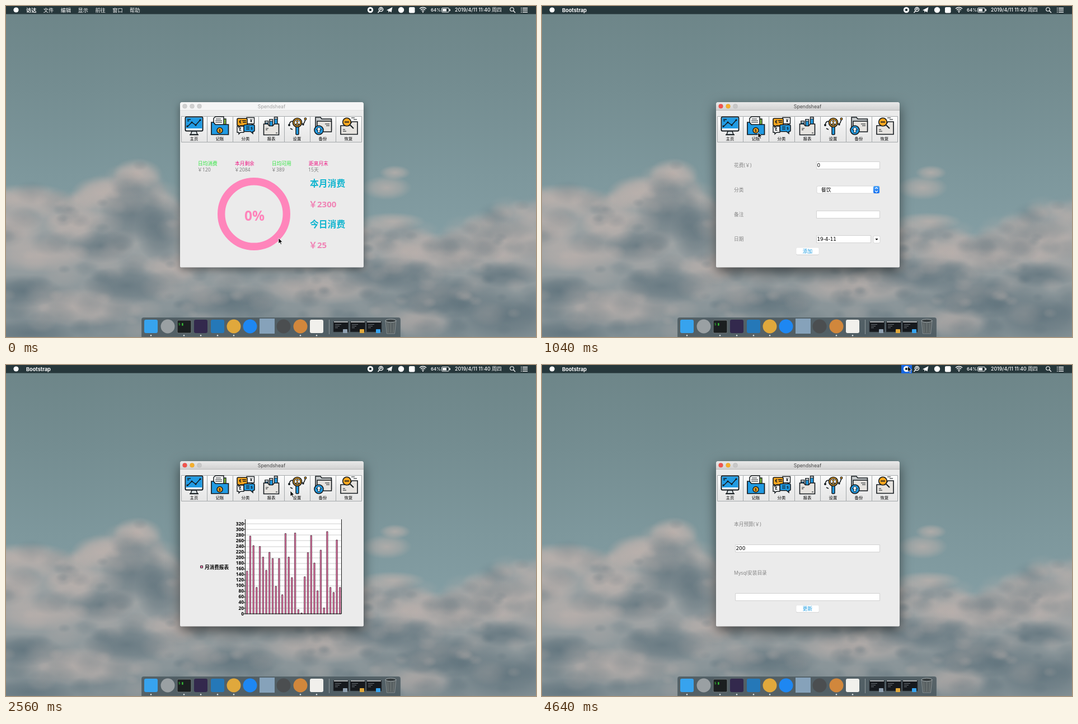
Recreate the animation shown at these times as an HTML page with a canvas. Size 947x592 px, loop 4720 ms.

```html
<!DOCTYPE html>
<html lang="zh-CN">
<head>
<meta charset="utf-8">
<title>Spendsheaf</title>
<style>
html, body { margin: 0; width: 100%; height: 100%; overflow: hidden; background: #7a9398; }
canvas { display: block; }
</style>
</head>
<body>
<canvas id="stage" width="947" height="592"></canvas>
<script>
const W = 947, H = 592, LOOP = 4720, STEP = 80;
const stage = document.getElementById('stage').getContext('2d');
let g = stage;

const CJK = '"Noto Sans CJK SC", sans-serif';
const UI = 'Inter, ' + CJK, SANS = '"Noto Sans", ' + CJK, WIDE = '"DejaVu Sans", ' + CJK;
const BLUE = '#219be3', ORANGE = '#f9a61f', PINK = '#ff85bb', INK = '#141a1e';

// ---- drawing helpers ----
function text(s, x, y, size, color, { font = SANS, weight = 400, align = 'left' } = {}) {
  g.font = `${weight} ${size}px ${font}`;
  g.textAlign = align;
  g.fillStyle = color;
  g.fillText(s, x, y + size * 0.37);
}
function paint(fill, stroke, width = 1) {
  if (fill) { g.fillStyle = fill; g.fill(); }
  if (stroke) { g.strokeStyle = stroke; g.lineWidth = width; g.stroke(); }
}
function box(x, y, w, h, fill, { r = 0, stroke, width } = {}) {
  g.beginPath();
  g.roundRect(x, y, w, h, r);
  paint(fill, stroke, width);
}
function disc(x, y, r, fill, stroke, width) {
  g.beginPath();
  g.arc(x, y, r, 0, 7);
  paint(fill, stroke, width);
}
function shape(d, fill, stroke, width) {
  const p = new Path2D(d);
  if (fill) { g.fillStyle = fill; g.fill(p); }
  if (stroke) { g.strokeStyle = stroke; g.lineWidth = width || 1; g.stroke(p); }
}
function vertical(y0, y1, ...colors) {
  const gr = g.createLinearGradient(0, y0, 0, y1);
  colors.forEach((c, i) => gr.addColorStop(i / (colors.length - 1), c));
  return gr;
}
function puff(x, y, rx, ry, rgb, alpha) {
  g.save();
  g.translate(x, y);
  g.scale(rx, ry);
  const gr = g.createRadialGradient(0, 0, 0, 0, 0, 1);
  gr.addColorStop(0, `rgba(${rgb},${alpha})`);
  gr.addColorStop(0.55, `rgba(${rgb},${alpha * 0.6})`);
  gr.addColorStop(1, `rgba(${rgb},0)`);
  g.fillStyle = gr;
  g.fillRect(-1, -1, 2, 2);
  g.restore();
}

// ---- desktop ----
const LIGHT = '190,178,173', SHADE = '92,112,122';
const SKYLINE = [[0, 335], [60, 328], [112, 348], [145, 320], [190, 312], [205, 290], [240, 283],
  [268, 298], [286, 335], [330, 365], [620, 400], [700, 385], [770, 420], [835, 385], [890, 362], [947, 350]];
const LIT = [[40, 345, 80, 28], [235, 300, 45, 28], [170, 335, 55, 32], [60, 445, 90, 32], [15, 400, 50, 40],
  [120, 390, 50, 35], [130, 540, 120, 35], [300, 470, 60, 30], [680, 325, 45, 22], [695, 298, 28, 13],
  [780, 440, 120, 35], [900, 420, 90, 40], [740, 565, 60, 30], [560, 505, 120, 30], [690, 385, 60, 16]];
const DARK = [[225, 370, 60, 55], [275, 400, 45, 60], [170, 430, 60, 30], [30, 510, 70, 30], [215, 500, 80, 35],
  [690, 480, 90, 32], [780, 520, 100, 40], [890, 555, 95, 45], [400, 530, 100, 30], [40, 585, 90, 25],
  [890, 480, 70, 24]];

function sky() {
  g.fillStyle = vertical(0, H, '#6d8588', '#748d91', '#7d979c', '#859fa5', '#88a0a6');
  g.fillRect(0, 0, W, H);
  g.filter = 'blur(6px)';
  g.beginPath();
  g.moveTo(-20, 340);
  SKYLINE.forEach(p => g.lineTo(...p));
  g.lineTo(W + 20, 350);
  g.lineTo(W + 20, H + 20);
  g.lineTo(-20, H + 20);
  paint(vertical(290, H, '#a1a6a6', '#99a0a2', '#828f94'));
  g.filter = 'none';
  LIT.forEach(b => puff(...b, LIGHT, 0.75));
  DARK.forEach(b => puff(...b, SHADE, 0.75));
  let seed = 11;
  const rnd = () => (seed = seed * 16807 % 2147483647) / 2147483647;
  for (let i = 0; i < 420; i++) {
    const x = rnd() * W, k = SKYLINE.findIndex(p => p[0] >= x);
    const [x0, y0] = SKYLINE[k - 1], [x1, y1] = SKYLINE[k];
    const top = y0 + (y1 - y0) * (x - x0) / (x1 - x0), depth = rnd() ** 1.5;
    const r = 7 + rnd() * 18;
    puff(x, top + depth * (H - top), r * 1.5, r, rnd() > 0.3 + depth * 0.35 ? LIGHT : SHADE, 0.22);
  }
}

function statusIcons() {
  disc(651, 7, 5.2, '#fff');
  box(649, 5, 4, 4, '#26373b', { r: 1 });
  disc(670, 6, 3.6, null, '#fff', 1.5);
  shape('M667.5 8.8 L664.5 12 M668.5 7 l1.5-2.5 1.5 2', null, '#fff', 1.5);
  shape('M680 7.5 L690.5 2 688.5 11.5 685.5 9.3 683.5 12 683.3 8.6Z', '#fff');
  disc(706, 7, 5.2, '#fff');
  box(720, 2, 10.5, 10.5, '#fff', { r: 2 });
  for (const r of [3, 6, 9]) {
    g.beginPath();
    g.arc(745, 11.5, r, -2.3, -0.84);
    paint(null, '#fff', 1.4);
  }
  disc(745, 11, 1, '#fff');
  text('64%', 759, 7, 8, '#fff', { font: UI, weight: 500 });
  box(778.5, 3.5, 13, 7.5, null, { r: 1.5, stroke: '#fff' });
  box(780, 5, 7, 4.5, '#fff');
  box(792.5, 5.5, 1.5, 3.5, '#fff');
  text('2019/4/11 11:40 周四', 802, 7, 8.8, '#fff', { font: UI, weight: 500 });
  disc(904, 6, 3.3, null, '#fff', 1.1);
  shape('M906.5 8.5 L910 12', null, '#fff', 1.2);
  for (const y of [3, 6.5, 10]) { box(920, y, 1.5, 1.5, '#fff'); box(923, y, 9, 1.5, '#fff'); }
}

function dock() {
  box(242, 557, 463, 40, 'rgba(72,86,92,.82)', { r: 4, stroke: 'rgba(130,145,150,.35)' });
  const tile = (x, c) => box(x - 12, 561, 24, 24, c, { r: 3 });
  const coin = (x, c) => disc(x, 573, 12.5, c);
  tile(259, '#37a3ee');
  coin(289, '#9aa0a3');
  box(306, 562, 25, 23, '#1b1f20', { r: 2, stroke: '#70787a' });
  text('$ ▮', 308, 569, 6, '#37c837', { font: WIDE });
  tile(348, '#33294d');
  tile(378, '#2578b8');
  coin(407, '#e0a83c');
  coin(436, '#1e87f2');
  box(453, 559, 27, 27, '#86a2ba');
  coin(496, '#4b4e50');
  coin(526, '#d1873c');
  tile(555, '#f1f0ec');
  box(577, 561, 1, 26, '#90999c');
  [['#8fa0b0', 598], ['#e0a83c', 628], ['#37a3ee', 657]].forEach(([badge, x]) => {
    box(x - 13, 564, 27, 19, '#16191d', { stroke: '#3b4247', width: 0.6 });
    box(x - 12, 564, 25, 2, '#a9adaf');
    for (let i = 0; i < 3; i++) box(x - 10, 569 + i * 3, 11 - i * 3, 0.8, '#858b90');
    box(x + 4, 578, 8, 7, badge, { r: 1 });
  });
  shape('M678 563 L697 563 694.5 586 680.5 586Z', '#596163', '#91999b', 0.8);
  g.beginPath();
  g.ellipse(687.5, 563, 9.5, 2.8, 0, 0, 7);
  paint('#343a3c', '#a8b0b2', 1);
  shape('M682 567 L683 584 M687.5 567 V584 M693 567 L692 584', null, '#79827f', 0.8);
  for (const x of [259, 318, 348, 378, 407, 526, 555]) disc(x, 589.3, 1.2, '#e8eeee');
}

// ---- toolbar ----
const LABELS = ['主页', '记账', '分类', '报表', '设置', '备份', '恢复'];
const ICONS = [
  () => {
    box(320.5, 198.5, 31, 25, '#fff', { r: 2, stroke: INK, width: 2 });
    box(321.5, 199.5, 29, 19.5, BLUE);
    shape('M324 216 L332 208 339 213 347 204 M324 203h6 M324 205.5h3', null, INK, 1.5);
    for (const [x, y] of [[324, 215], [332, 208], [339, 213], [347, 204]]) disc(x, y, 1.6, INK);
    shape('M332 224 h8 l2 6 h-12z', '#d7dde0', INK, 1.5);
    shape('M328 230.3 h16', null, INK, 1.8);
  },
  () => {
    shape('M375 212 V202 h18 v10z', '#86c440', INK, 1.3);
    shape('M371 214 V201 l3-3 h15 v16z', '#fff', INK, 1.5);
    shape('M375 202h9 M374 205h12 M374 208h12', null, INK, 1.2);
    shape('M367 230 V208 h4 l3 4 h23.5 v18z', BLUE, INK, 1.7);
    disc(382, 222.5, 5, ORANGE, INK, 1.5);
    text('$', 382, 222.5, 7.5, INK, { weight: 700, align: 'center' });
  },
  () => {
    shape('M430 199.5 h13.5 v11 h-2 l-2 2.5 v-2.5 h-9.5z', '#fff', INK, 1.4);
    shape('M413 215 h12 v11 h-6 l-3 3 v-3 h-3z', '#fff', INK, 1.4);
    shape('M415 201 h14 q2 0 2 2 v9 q0 2-2 2 h-10 l-3 3 v-3 h-1 q-2 0-2-2 v-9 q0-2 2-2z', ORANGE, INK, 1.6);
    shape('M427 212.5 h15 q2 0 2 2 v8 q0 2-2 2 h-1 v3.5 l-4-3.5 h-10 q-2 0-2-2 v-8 q0-2 2-2z', BLUE, INK, 1.6);
    shape('M423 208h6 M422 205h7 M429 216.5h6 M429 220h6', null, INK, 1.3);
    text('¥', 438, 205, 8, INK, { weight: 700, align: 'center' });
    text('€', 418.5, 207.5, 8, INK, { weight: 700, align: 'center' });
    text('£', 418.5, 220.5, 8, INK, { weight: 700, align: 'center' });
    text('$', 439, 218.5, 7, INK, { weight: 700, align: 'center' });
  },
  () => {
    [[463, 206], [471, 203], [479.5, 199]].forEach(([x, y]) => {
      box(x, y, 5.5, 218 - y, BLUE, { stroke: INK, width: 1.4 });
      box(x, y, 5.5, 3, '#e9edf0', { stroke: INK, width: 1.1 });
    });
    shape('M460.5 230.5 V211 h7 l3 3.5 h6 l3-3.5 h8 v19.5z', '#e6e3df', INK, 1.6);
    shape('M464 219h5 M464 221.5h3 M482 227h3', null, INK, 1);
  },
  () => {
    shape('M506 212 Q508 204 514 207 M527 208 Q532 216 535 202 M508 219 l4 2', null, INK, 1.5);
    disc(506, 213, 2, INK); disc(535, 202, 1.8, ORANGE, INK, 1.2); disc(531, 212, 1.7, INK);
    box(518, 216, 5, 14, BLUE, { r: 1, stroke: INK, width: 1.5 });
    disc(520.5, 208.5, 8, ORANGE, INK, 1.7);
    disc(520.5, 208.5, 5.3, '#fff', INK, 1.1);
    disc(520.5, 206.5, 1.8, ORANGE, INK, 1);
    shape('M517 212 q3.5-5 7 0z', ORANGE, INK, 1);
  },
  () => {
    shape('M553 222 V199 h9 l2 3 h17.5 v20z', '#c5c9cb', INK, 1.5);
    shape('M556 225 V206 h25.5 v19z', '#e6e3df', INK, 1.5);
    shape('M570 211h8 M572 214h6', null, INK, 1);
    disc(559, 222, 8, BLUE, INK, 1.6);
    shape('M559 216.5 l4.5 5 h-2.7 v5 h-3.6 v-5 h-2.7z', '#fff', INK, 1);
  },
  () => {
    shape('M598 229.5 V214 h15 l5-7 h10 v22.5z', '#e6e3df', INK, 1.6);
    shape('M615 213 L621 219', null, INK, 2);
    shape('M602 221h4 M602 224h6 M617 200h6 M621 203h6', null, INK, 1.1);
    disc(609, 207.5, 7.3, ORANGE, INK, 1.6);
    shape('M605 207.5 h8', null, INK, 1.8);
  },
];

function toolbar(pressed) {
  ICONS.forEach((icon, i) => {
    const x = 313 + 46 * i;
    box(x + 0.5, 197.5, 46, 46, vertical(197, 243, '#fdfdfd', '#eeeeee', '#e6e6e6'), { stroke: '#a5a9ab' });
    icon();
    text(LABELS[i], x + 23, 237.5, 7.4, '#000', { align: 'center', weight: 500 });
    if (i === pressed) box(x + 1, 198, 45, 45, 'rgba(50,50,50,.38)');
  });
}

// ---- window pages ----
const caption = (s, y) => text(s, 343, y, 8.7, '#858585');
function field(x, y, w, value = '') {
  box(x + 0.5, y + 0.5, w - 1, 13, '#fff', { stroke: '#d2d2d2' });
  text(value, x + 1.5, y + 7, 8.8, '#000', { font: WIDE });
}
function button(s, x, y) {
  box(x, y + 1, 41, 12.5, '#c9c9c9', { r: 2.5 });
  box(x, y, 41, 12.8, '#fff', { r: 2.5, stroke: '#dadada', width: 0.5 });
  text(s, x + 20.5, y + 6.4, 8.7, '#1a9be0', { weight: 500, align: 'center' });
}

function home() {
  [['日均消费', '￥120'], ['本月剩余', '￥2084'], ['日均可用', '￥389'], ['距离月末', '15天']].forEach(([name, value], i) => {
    const x = 343 + 66 * i;
    text(name, x, 282, 8.7, i % 2 ? '#ee1783' : '#2ce63c', { weight: 500 });
    text(value, x - 1, 292.5, 8.7, '#808080');
  });
  disc(443, 372, 58.3, null, PINK, 13.4);
  text('0%', 444, 375, 24.5, PINK, { weight: 700, align: 'center' });
  [['本月消费', '￥2300', 317], ['今日消费', '￥25', 390.5]].forEach(([name, value, y]) => {
    text(name, 543, y, 15.8, '#10b5cf', { weight: 700 });
    text(value, 541, y + 37, 15, '#f083b5', { weight: 600 });
  });
}

function record() {
  ['花费(￥)', '分类', '备注', '日期'].forEach((s, i) => caption(s, 285 + 44 * i));
  field(490, 278, 114, '0');
  box(491, 322, 112, 13, '#fff', { r: 2.5, stroke: '#d0d0d0', width: 0.8 });
  text('餐饮', 499, 328.5, 8.7, '#000', { weight: 500 });
  box(592, 322, 11, 13, vertical(322, 335, '#4aa3f8', '#1670f0'), { r: 2.5 });
  shape('M595 327 l2.5-2.5 2.5 2.5 M595 330.5 l2.5 2.5 2.5-2.5', null, '#fff', 1.2);
  field(490, 366, 114);
  field(490, 410, 98, '19-4-11');
  box(592, 411, 12, 13, '#fff', { r: 2.5, stroke: '#cfcfcf', width: 0.8 });
  shape('M595.5 416 h5 l-2.5 3z', '#000');
  button('添加', 454, 432);
}

function categories() {
  box(343.5, 276.5, 262.5, 143, '#fff', { stroke: '#9c9c9c' });
  box(344, 277, 261.5, 10.5, '#f4f4f4');
  text('分类名称', 346, 282.3, 7.4, '#000');
  text('消费次数', 476, 282.3, 7.4, '#000');
  ['餐饮', '交通', '住宿', '话费'].forEach((s, i) => {
    const y = 293.3 + 10.5 * i;
    text(s, 345, y, 8.2, '#000', { weight: 500 });
    text('0', 475, y, 8.6, '#000', { font: WIDE });
  });
  ['新增', '编辑', '删除'].forEach((s, i) => button(s, 401.5 + 52.5 * i, 427));
}

const SPEND = [152, 277, 243, 94, 240, 202, 155, 219, 197, 98, 197, 68, 286, 202, 129, 288, 15, 3, 132, 218,
  279, 181, 82, 227, 21, 293, 94, 76, 263, 94];
function report() {
  box(428, 276, 171, 169, '#fff');
  for (let v = 0; v <= 320; v += 20) {
    const y = 445 - v * 0.502;
    box(428, Math.round(y) - 0.5, 171, 1, '#cdcdcd');
    box(425, Math.round(y) - 0.5, 3, 1, '#000');
    text(v, 425, y - 0.5, 8.3, '#000', { weight: 800, align: 'right' });
  }
  SPEND.forEach((v, i) => {
    const h = v * 0.502;
    box(429.5 + i * 5.73, 445 - h, 2.3, h, '#ff7db5', { stroke: '#33202a', width: 0.8 });
  });
  shape('M427.5 276 V445 H599.5 V276', null, '#1a1a1a', 1);
  box(347.5, 359, 4, 4, '#ff7db5', { stroke: '#222' });
  text('月消费报表', 355, 361.5, 8.6, '#000', { weight: 900 });
}

function settings() {
  caption('本月预算(￥)', 285);
  field(345, 321, 259, '200');
  caption('Mysql安装目录', 372);
  field(345, 408, 259);
  button('更新', 454, 429.5);
}

// ---- timeline ----
const PAGES = [[0, home], [960, record], [1600, categories], [2080, report], [3120, settings]];
const PRESSES = [[720, 960, 1], [1440, 1600, 2], [1840, 2080, 3], [2880, 3120, 4]];
const POINTER = [[0, 487, 415], [80, 487, 415], [560, 386, 226], [1200, 386, 226], [1440, 428, 228], [1600, 428, 228],
  [1840, 474, 228], [2400, 474, 228], [2560, 508, 225], [2640, 521, 222], [4080, 521, 222],
  [4320, 545, 194], [4560, 648, 16], [4640, 653.5, 2], [LOOP, 653.5, 2]];
const FOCUS_AT = 640, STOP_AT = 4600;

function pointer(t) {
  const i = POINTER.findIndex(p => p[0] > t);
  const [t0, x0, y0] = POINTER[i - 1], [t1, x1, y1] = POINTER[i];
  const u = (t - t0) / (t1 - t0), e = u * u * (3 - 2 * u);
  g.save();
  g.translate(x0 + (x1 - x0) * e, y0 + (y1 - y0) * e);
  shape('M0 0 V10 L2.3 7.9 3.9 11.4 5.5 10.7 4 7.2 H7.1Z', '#000', '#fff', 0.8);
  g.restore();
}

function frameWindow(active) {
  g.save();
  g.shadowColor = `rgba(0,0,0,${active ? 0.55 : 0.4})`;
  g.shadowBlur = active ? 22 : 14;
  g.shadowOffsetY = active ? 8 : 4;
  box(311, 172, 328, 295.5, '#ebebeb', { r: [4, 4, 2, 2] });
  g.restore();
  box(311, 172, 328, 15, active ? vertical(172, 187, '#e9e9e9', '#d0d0d0') : '#f5f5f5', { r: [4, 4, 0, 0] });
  box(311, 186, 328, 0.8, active ? '#b4b4b4' : '#dadada');
  const lights = active ? ['#f2544d', '#f6b02c', '#c8c8c8'] : ['#d0d0d0', '#d0d0d0', '#d0d0d0'];
  lights.forEach((c, i) => disc(319.5 + 13 * i, 179.3, 4, c, 'rgba(0,0,0,.12)', 0.5));
  text('Spendsheaf', 474.5, 179.3, 8.7, active ? '#454545' : '#a0a0a0', { font: UI, align: 'center' });
}

function menu(active, stopping) {
  if (stopping) box(642, 0, 19, 15, '#1566e2');
  const names = active ? ['Bootstrap'] : ['访达', '文件', '编辑', '显示', '前往', '窗口', '帮助'];
  names.forEach((s, i) => text(s, 36 + 30.85 * i, 7.2, 9.2, '#fff', { font: UI, weight: active || !i ? 700 : 500 }));
  disc(18, 7, 4.6, '#fff');
  statusIcons();
}

const backdrop = document.createElement('canvas');
backdrop.width = W;
backdrop.height = H;
g = backdrop.getContext('2d');
sky();
box(0, 0, W, 14.5, '#26373b');
dock();
g = stage;

function draw(now) {
  const t = Math.floor(now % LOOP / STEP) * STEP;
  const active = t >= FOCUS_AT;
  const press = PRESSES.find(([from, to]) => t >= from && t < to);
  g.drawImage(backdrop, 0, 0);
  menu(active, t >= STOP_AT);
  frameWindow(active);
  toolbar(press ? press[2] : -1);
  PAGES.findLast(p => t >= p[0])[1]();
  pointer(t);
}

const start = performance.now();
(function tick() {
  draw(performance.now() - start);
  requestAnimationFrame(tick);
})();
</script>
</body>
</html>
```
